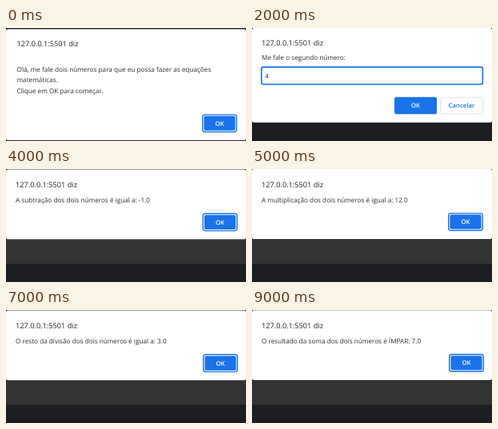
Write an HTML page that moves like this. It is 300 px wide and 142 px high and loops after 10 s.

```html
<!DOCTYPE html>
<html lang="pt-BR">
<head>
<meta charset="utf-8">
<title>Equações</title>
<style>
  html, body { margin: 0; width: 100%; height: 100%; overflow: hidden; background: #1d1e22; }
  svg { display: block; width: 100%; height: 100%; }
  text { font: 8.2px "Open Sans", "Noto Sans", sans-serif; fill: #2b2d31; text-rendering: geometricPrecision; }
  .title { font-size: 9.2px; fill: #202124; }
  .label { font-size: 7.8px; font-weight: 600; text-anchor: middle; }
</style>
</head>
<body>
<svg id="stage" viewBox="0 0 300 142"></svg>
<script>
const BLUE = '#1a73e8';
const SCENE_MS = 1000;
const stage = document.getElementById('stage');

const rect = (x, y, w, h, fill, extra = '') =>
  `<rect x="${x}" y="${y}" width="${w}" height="${h}" fill="${fill}" ${extra}/>`;
const text = (x, y, content, extra = '') => `<text x="${x}" y="${y}" ${extra}>${content}</text>`;
const label = (x, y, content, fill) => text(x, y, content, `class="label" style="fill:${fill}"`);

const dialog = (top, bottom, titleY, x = 12) =>
  rect(0, top, 300, bottom - top, '#fff', 'rx="2.5"') +
  text(x, titleY, '127.0.0.1:5501 diz', 'class="title"');

// Focused OK button: blue ring, white gap, solid face.
const focusedOk = (cx, cy) =>
  rect(cx - 21.3, cy - 10.8, 42.6, 21.6, '#fff', `rx="3" stroke="${BLUE}" stroke-width="1.4"`) +
  rect(cx - 19.6, cy - 9.1, 39.2, 18.2, BLUE, 'rx="2"') +
  label(cx, cy + 2.8, 'OK', '#fff');

const welcome = () =>
  rect(0, 0, 300, 142, '#2a2b2e') +
  dialog(1.5, 141, 23.4, 13.5) +
  ['Olá, me fale dois números para que eu possa fazer as equações',
   'matemáticas.',
   'Clique em OK para começar.'].map((line, i) => text(13.5, 55 + i * 13.4, line)).join('') +
  focusedOk(267, 119.7);

const prompt = (question, value, valueColor, top, dy) =>
  dialog(top, 120.5 + dy, 23.3 + dy * 0.6) +
  text(12, 42 + dy, question) +
  rect(11.8, 50.8 + dy, 276.6, 21.6, '#fff', `rx="2.5" stroke="${BLUE}" stroke-width="1.6"`) +
  text(16.5, 64.7 + dy, value, `style="fill:${valueColor};font-size:7.8px"`) +
  rect(178, 88.5 + dy, 53, 21.5, BLUE, 'rx="2.5"') +
  label(204.5, 102 + dy, 'OK', '#fff') +
  rect(235.5, 89 + dy, 53, 20.5, '#fff', 'rx="2.5" stroke="#dadce0" stroke-width=".8"') +
  label(262, 102 + dy, 'Cancelar', BLUE);

const result = (message, dx = 0, dy = 0) =>
  rect(0, 0, 300, 119, '#333') +
  dialog(1 + dy, 88.8 + dy, 23.5 + dy) +
  text(12, 42.6 + dy, message) +
  focusedOk(268 + dx, 67.3 + dy);

const scenes = [
  welcome(),
  prompt('Me fale o primeiro número:', '3', '#55585d', 1, 0),
  prompt('Me fale o segundo número:', '4', '#202124', 0, -1.7),
  result('A soma dos dois números é igual a: 7.0'),
  result('A subtração dos dois números é igual a: -1.0', -0.5, -0.5),
  result('A multiplicação dos dois números é igual a: 12.0', -1, -0.9),
  result('A divisão dos dois números é igual a: 0.75', 0, -0.5),
  result('O resto da divisão dos dois números é igual a: 3.0', 0, -0.5),
  result('A potência dos dois números é igual a: 81.0', 0, -0.5),
  result('O resultado da soma dos dois números é ÍMPAR: 7.0', 0, -0.8),
];

let shown = -1;
function draw() {
  const index = Math.floor(performance.now() / SCENE_MS) % scenes.length;
  if (index !== shown) stage.innerHTML = scenes[shown = index];
  requestAnimationFrame(draw);
}
draw();
</script>
</body>
</html>
```
